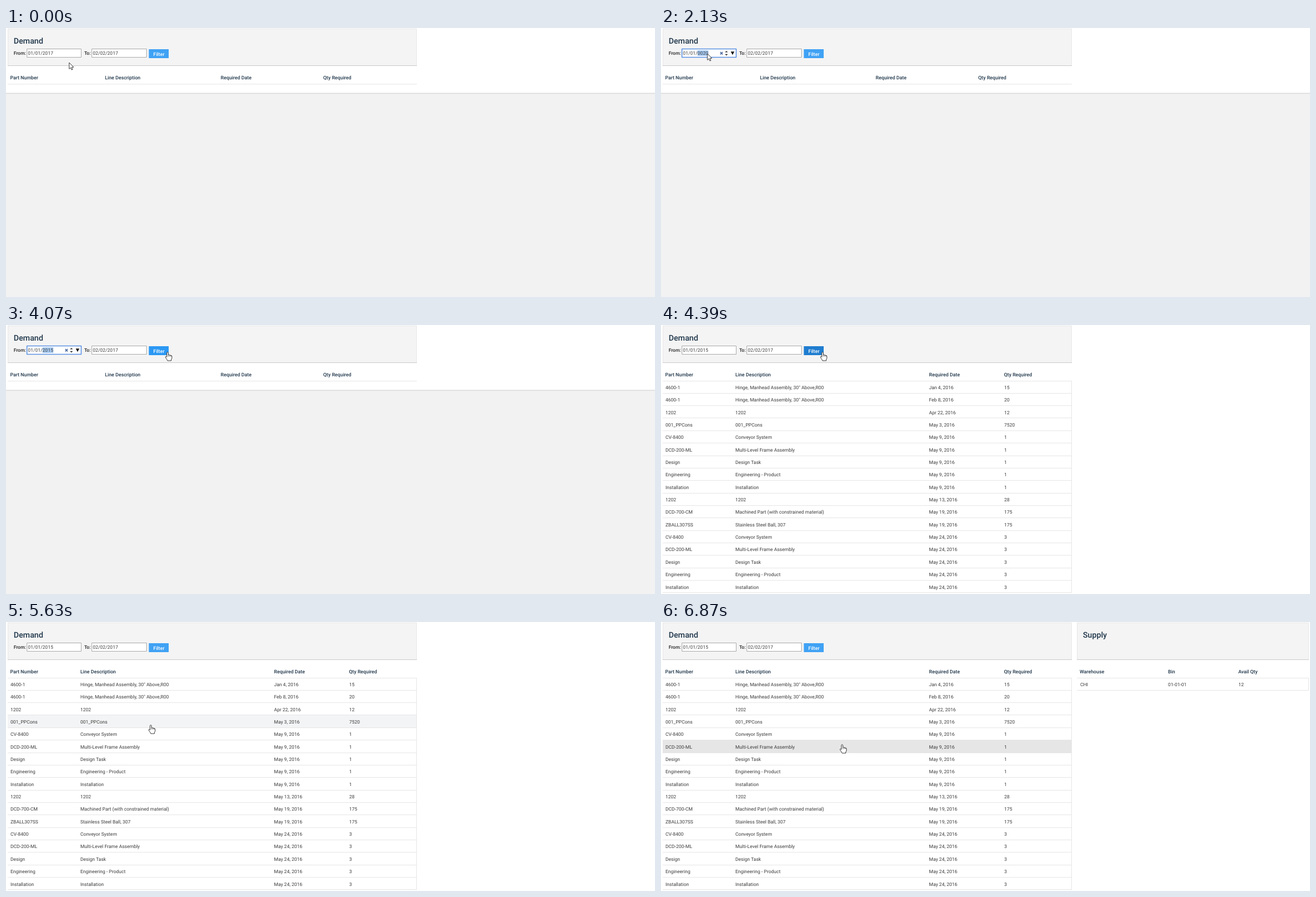
Animation of 1161x482 px, one loop 8000 ms. Source, as an HTML page with a canvas:

```html
<!DOCTYPE html>
<html lang="en">
<head>
<meta charset="utf-8">
<title>Demand</title>
<style>
html, body { margin: 0; width: 100%; height: 100%; overflow: hidden; background: #fff; }
canvas { display: block; }
</style>
</head>
<body>
<canvas id="stage" width="1161" height="482"></canvas>
<script>
const ctx = document.getElementById('stage').getContext('2d');
const LOOP = 8000;
const FONT = 'Roboto, Arial, sans-serif';
const NAVY = '#1f364a', INK = '#3b3b3b';
const TOP = 100.4, PITCH = 22.35;

const hinge = ['4600-1', 'Hinge, Manhead Assembly, 30" Above,R00'];
const kit = [
  ['CV-8400', 'Conveyor System'],
  ['DCD-200-ML', 'Multi-Level Frame Assembly'],
  ['Design', 'Design Task'],
  ['Engineering', 'Engineering - Product'],
  ['Installation', 'Installation']
];
const kitRows = (date, qty) => kit.map(k => [...k, date, qty]);
const ROWS = [
  [...hinge, 'Jan 4, 2016', '15'],
  [...hinge, 'Feb 8, 2016', '20'],
  ['1202', '1202', 'Apr 22, 2016', '12'],
  ['001_PPCons', '001_PPCons', 'May 3, 2016', '7520'],
  ...kitRows('May 9, 2016', '1'),
  ['1202', '1202', 'May 13, 2016', '28'],
  ['DCD-700-CM', 'Machined Part (with constrained material)', 'May 19, 2016', '175'],
  ['ZBALL307SS', 'Stainless Steel Ball, 307', 'May 19, 2016', '175'],
  ...kitRows('May 24, 2016', '3')
];
const DEMAND = ['Part Number', 'Line Description', 'Required Date', 'Qty Required'];
const SUPPLY = ['Warehouse', 'Bin', 'Avail Qty'];

// Cursor moves: start time, time per step, step count, then from / control / to.
const MOVES = [
  [200, 76, 6, [113, 62], [92, 52], [83, 46]],
  [3300, 77, 8, [83, 46], [190, 15], [294, 44]],
  [3990, 80, 2, [294, 44], [291, 45], [289, 48]],
  [5080, 78, 8, [289, 48], [258, 95], [259, 184]],
  [5704, 78, 3, [259, 184], [270, 208], [301, 215]],
  [5940, 77, 4, [301, 215], [314, 217], [324, 219]]
];

function cursorAt(t) {
  let pos = MOVES[0][3];
  for (const [start, dt, n, a, c, b] of MOVES) {
    if (t < start) break;
    const u = Math.min(n, Math.floor((t - start) / dt) + 1) / n;
    const bend = i => (1 - u) ** 2 * a[i] + 2 * u * (1 - u) * c[i] + u * u * b[i];
    pos = [bend(0), bend(1)];
  }
  return pos;
}

function box(x, y, w, h, color) {
  ctx.fillStyle = color;
  ctx.fillRect(x, y, w, h);
}

function text(s, x, y, size = 8.5, color = INK, weight = 400) {
  ctx.font = `${weight} ${size}px ${FONT}`;
  ctx.fillStyle = color;
  ctx.fillText(s, x, y);
}

function poly(points, color) {
  ctx.beginPath();
  points.forEach(([x, y]) => ctx.lineTo(x, y));
  ctx.closePath();
  ctx.fillStyle = color;
  ctx.fill();
}

function frame(x, y, w, h, color, width = 1) {
  ctx.strokeStyle = color;
  ctx.lineWidth = width;
  ctx.strokeRect(x, y, w, h);
}

function panel(x, w, title) {
  box(x, 1, w, 67, '#f4f4f4');
  frame(x + 0.5, 1.5, w - 1, 66, '#e8e8e8');
  box(x, 67, w, 1, '#c9c9c9');
  text(title, x + 10.7, 27.6, 14.2, NAVY, 500);
}

function headings(labels, xs) {
  labels.forEach((s, i) => text(s, xs[i], 91.7, 8.75, NAVY, 500));
}

function table(x, w, rows, xs, active, shade) {
  rows.forEach((row, r) => {
    const y = TOP + r * PITCH;
    if (r === active) box(x, Math.round(y), w, 22, shade);
    box(x, Math.round(y + PITCH) - 1, w, 1, '#e6e6e6');
    row.forEach((s, i) => text(s, xs[i], y + 14.5));
  });
  box(x, 100, w, 1, '#e6e6e6');
  box(x + w - 1, 100, 1, Math.round(rows.length * PITCH), '#e6e6e6');
}

function controls() {
  ctx.strokeStyle = '#46659c';
  ctx.lineWidth = 1.5;
  ctx.beginPath();
  ctx.moveTo(106, 43); ctx.lineTo(110.4, 47.4);
  ctx.moveTo(110.4, 43); ctx.lineTo(106, 47.4);
  ctx.stroke();
  poly([[114.4, 43.6], [117, 41], [119.6, 43.6]], '#333');
  poly([[114.4, 46.8], [117, 49.4], [119.6, 46.8]], '#333');
  poly([[124.8, 42.2], [131.2, 42.2], [128, 48.2]], '#111');
}

function dateField(x, w, value, focus) {
  box(x, 37, w, 16, '#fff');
  if (focus) frame(x + 0.5, 37.5, w - 1, 15, '#5c92e2', 1.6);
  else frame(x + 0.5, 37.5, w - 1, 15, '#a9a9a9');
  if (focus) box(x + 28.3, 40, 19.4, 10, '#a5caf3');
  text(value, x + 2.2, 48.2, 8.5, '#444');
}

function arrow(x, y) {
  ctx.beginPath();
  [[0, 0], [0, 11.4], [2.6, 9], [4.4, 13], [6.2, 12.2], [4.5, 8.3], [8, 8.2]]
    .forEach(([dx, dy]) => ctx.lineTo(x + dx, y + dy));
  ctx.closePath();
  paintCursor();
}

function hand(x, y) {
  ctx.save();
  ctx.translate(x, y);
  ctx.beginPath();
  ctx.moveTo(-1.3, 9.5);
  ctx.lineTo(-1.3, 1.5);
  ctx.quadraticCurveTo(0, -0.6, 1.3, 1.5);
  ctx.lineTo(1.3, 5.6);
  ctx.quadraticCurveTo(2.9, 4.5, 3.7, 6.2);
  ctx.quadraticCurveTo(5.2, 5.2, 6, 6.9);
  ctx.quadraticCurveTo(7.8, 6.3, 7.8, 8.4);
  ctx.lineTo(7.8, 11);
  ctx.quadraticCurveTo(7.4, 13, 6.5, 14);
  ctx.lineTo(6.5, 16);
  ctx.lineTo(0, 16);
  ctx.quadraticCurveTo(-1, 13.6, -3.6, 10.2);
  ctx.quadraticCurveTo(-4, 8.2, -2.6, 8.3);
  ctx.closePath();
  paintCursor();
  ctx.beginPath();
  for (const dx of [1.3, 3.7, 6]) {
    ctx.moveTo(dx, 6);
    ctx.lineTo(dx, 8.6);
  }
  ctx.lineWidth = 0.7;
  ctx.stroke();
  ctx.restore();
}

function paintCursor() {
  ctx.fillStyle = '#fff';
  ctx.fill();
  ctx.strokeStyle = '#222';
  ctx.lineWidth = 0.9;
  ctx.lineJoin = 'round';
  ctx.stroke();
}

function yearAt(t) {
  if (t < 2130) return '2017';
  if (t < 2200) return '0020';
  return t < 2520 ? '0201' : '2015';
}

function draw(t) {
  const [cx, cy] = cursorAt(t);
  const loaded = t >= 4310, picked = t >= 6870;
  const focus = t >= 730 && t < 4230;
  const overField = t < 730 && cy < 53;
  const overButton = t >= 3990 && cy < 54;
  const pressed = t >= 4230 && t < 4470;
  const row = loaded && cy > TOP ? Math.floor((cy - TOP) / PITCH) : -1;

  box(0, 0, 1161, 482, '#fff');
  if (!loaded) {
    box(0, 117, 1161, 365, '#f2f2f2');
    box(0, 116.5, 1161, 1, '#cdcdcd');
  }

  panel(3, 732, 'Demand');
  text('From:', 13.7, 48.2, 8.5, '#222', 500);
  text('To:', 140, 48.2, 8.5, '#222', 500);
  dateField(37, 98, '01/01/' + yearAt(t), focus);
  dateField(153, 99, '02/02/2017', false);
  if (focus || overField) controls();
  box(255.5, 38, 35.5, 16, pressed ? '#1f7dd0' : overButton ? '#2b98f3' : '#40a2f4');
  text('Filter', 263.6, 50, 8.7, '#fff', 500);

  if (loaded) {
    headings(DEMAND, [7.4, 133, 479.5, 613.5]);
    table(3, 732, ROWS, [8, 133, 479.5, 614], row, picked ? '#e6e6e6' : '#f3f4f5');
  } else {
    headings(DEMAND, [7.4, 177, 384, 567.5]);
    box(3, 100, 732, 1, '#e6e6e6');
  }

  if (picked) {
    panel(744, 415, 'Supply');
    headings(SUPPLY, [749, 907, 1032.7]);
    table(744, 415, [['CHI', '01-01-01', '12']], [750, 907, 1033], -1);
  }

  (overButton || row >= 0 ? hand : arrow)(cx, cy);
}

ctx.textRendering = 'geometricPrecision';
const origin = performance.now();
function tick() {
  draw((performance.now() - origin) % LOOP);
  requestAnimationFrame(tick);
}
tick();
</script>
</body>
</html>
```
